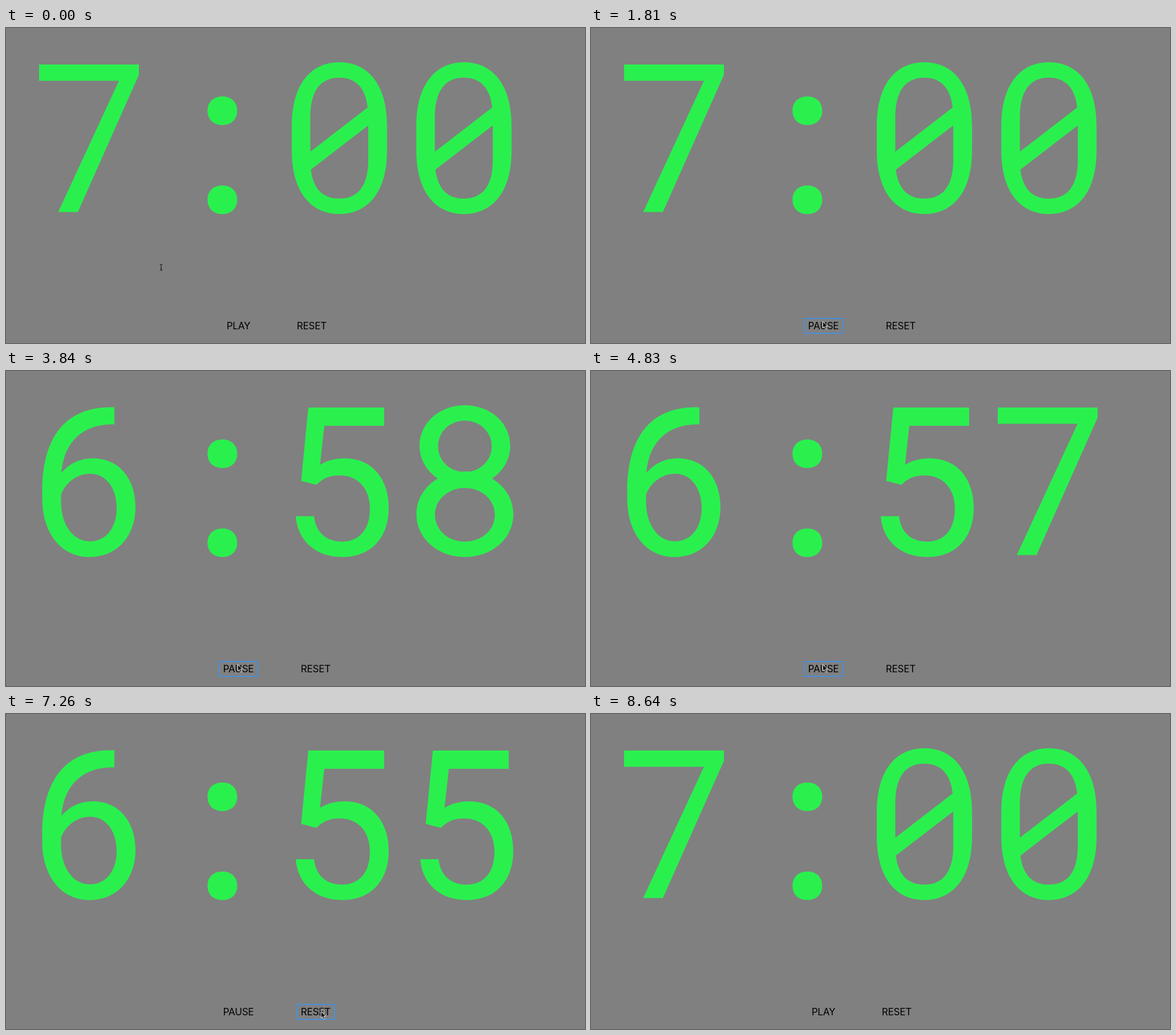
Write an HTML page that moves like this. It is 1015x552 px and loops after 8.74 s.

```html
<!DOCTYPE html>
<html lang="en">
<head>
<meta charset="utf-8">
<title>Countdown timer</title>
<style>
  html, body { margin: 0; width: 100%; height: 100%; overflow: hidden; background: #808080; }
  svg { display: block; width: 100%; height: 100%; }
  text { font: 17px Inter, Roboto, sans-serif; letter-spacing: -.2px; text-anchor: middle; fill: #000; }
</style>
</head>
<body>
<svg viewBox="0 0 1015 552">
  <rect width="1015" height="552" fill="#808080"/>
  <g fill="#2af04e">
    <path id="min"/>
    <path id="colon"/>
    <path id="tens"/>
    <path id="ones"/>
  </g>
  <text id="play" x="407.5" y="528"></text>
  <text id="reset" y="528">RESET</text>
  <rect id="ring" y="509" height="26" rx="1" fill="none" stroke="#4a8fdc" stroke-width="2"/>
  <circle id="click" r="7" fill="#fff" fill-opacity=".12" stroke="#222" stroke-width=".9"/>
  <path id="arrow" d="M.3 .3V11.8L2.9 9.3L4.9 13.8L7 12.9L5 8.6H8.7Z" fill="#111" stroke="#fff" stroke-width=".8" stroke-linejoin="round"/>
  <path id="beam" d="M-2.3 -5.5L0 -4.5L2.3 -5.5M0 -4.5V4.5M-2.3 5.5L0 4.5L2.3 5.5M-1.2 2H1.2" fill="none" stroke="#111"/>
</svg>
<script>
const LOOP = 8740, CELL = 218.33;
const PRESS_PLAY = 1690, RUN = 1810, PRESS_RESET = 7260, STOP = 7380, BLUR = 8640;
const $ = id => document.getElementById(id);

// Round-ended shape: curved from y0 to y1, straight to y2, curved to y3.
// A negative rx reverses the direction and so cuts a hole.
function capsule(cx, rx, y0, y1, y2, y3, kx = .56, ky = kx) {
  const l = cx - rx, r = cx + rx, a = cx - kx * rx, b = cx + kx * rx;
  const up = y1 - ky * (y1 - y0), down = y2 + ky * (y3 - y2);
  return `M${l} ${y1}C${l} ${up} ${a} ${y0} ${cx} ${y0}C${b} ${y0} ${r} ${up} ${r} ${y1}` +
         `V${y2}C${r} ${down} ${b} ${y3} ${cx} ${y3}C${a} ${y3} ${l} ${down} ${l} ${y2}Z`;
}
const oval = (cx, cy, rx, ry, k) => capsule(cx, rx, cy - ry, cy, cy, cy + ry, k);

const six = 'M190 63.5V93.5H187C135 93.5 102 123 97 178.5C112 161 131 153 152 153C200 153 227 191 227 238C227 288 196 326 146.5 326C95 326 63.5 282 63.5 224V211C63.5 138 88 63.5 184 63.5Z' +
  'M147 180C126 180 105 194 96.5 217V229C96.5 270 118 298.5 147 298.5C176 298.5 194 274 194 240C194 206 176 180 147 180Z';

const glyphs = {
  0: capsule(147.8, 83.5, 60, 171.5, 214.8, 326, .574, .674) +
     capsule(147.6, -50.8, 87, 157, 231, 299, .66) +
     'M83 227.4L211 128.7V161L83 259.5Z',
  5: 'M80.8 192.5L93.3 64H226.3V96H121.3L113.8 164.5C126.3 157 140.3 153 157.3 153C205.3 153 234.3 189 234.3 240C234.3 290 205.3 326 152.3 326C107.3 326 74.3 298 71.3 254.5H103.3C106.3 283 125.3 299 152.3 299C184.3 299 201.3 276 201.3 241C201.3 207 181.3 183 148.3 183C128.3 183 118.3 189 107.3 199.5Z',
  6: six,
  7: 'M58 64H233V82L126 322.5H91.5L198 92.5H58Z',
  8: oval(149.5, 131, 79.5, 71) + oval(149.5, 251, 85, 75) +
     oval(149.5, 132, -47, 45) + oval(149.5, 252, -52.5, 47),
  9: six
};

// Pointer moves, each from where the last one ended: start, steps, end, bend.
const STEP = 117;
const moves = [
  { start: 0, steps: 1, to: [272, 419.5] },
  { start: 270, steps: 1, to: [268, 340] },
  { start: 510, steps: 8, to: [404, 510], bend: [565, 390] },
  { start: 1450, steps: 1, to: [406, 514] },
  { start: 5790, steps: 2, to: [403.5, 517] },
  { start: 6110, steps: 6, to: [511, 522] },
  { start: 6850, steps: 2, to: [552, 521] },
  { start: 7790, steps: 4, to: [1016, 552] }
];

function pointerAt(t) {
  const i = moves.findLastIndex(m => m.start <= t);
  const { start, steps, to, bend } = moves[i];
  const from = i ? moves[i - 1].to : to;
  const p = Math.min(1, (Math.floor((t - start) / STEP) + 1) / steps);
  const u = 1 - (1 - p) ** 2;
  return to.map((end, k) => {
    const mid = bend ? bend[k] : (from[k] + end) / 2;
    return from[k] * (1 - u) ** 2 + 2 * mid * u * (1 - u) + end * u * u;
  });
}

const place = (el, x, y) => el.setAttribute('transform', `translate(${x} ${y})`);
const show = (el, on) => el.setAttribute('visibility', on ? 'visible' : 'hidden');

function setDigit(el, digit, cell) {
  const turn = digit === 9 ? 'rotate(180 145.5 193)' : '';
  el.setAttribute('d', glyphs[digit]);
  el.setAttribute('transform', `translate(${cell * CELL} 0) ${turn}`);
}

$('colon').setAttribute('d', oval(379.3, 145, 26, 25, .61) + oval(379.3, 301, 26, 25, .61));

function draw(t) {
  const running = t >= RUN && t < STOP;
  const left = 420 - (running ? Math.floor((t - 1750) / 1010) : 0);
  setDigit($('min'), Math.floor(left / 60), 0);
  setDigit($('tens'), Math.floor(left % 60 / 10), 2);
  setDigit($('ones'), left % 10, 3);

  const resetX = running ? 543 : 536;
  $('play').textContent = running ? 'PAUSE' : 'PLAY';
  $('reset').setAttribute('x', resetX);

  const onReset = t >= PRESS_RESET;
  const width = onReset ? 66 : running ? 67 : 54;
  show($('ring'), t >= PRESS_PLAY && t < BLUR);
  $('ring').setAttribute('x', (onReset ? resetX : 407.5) - width / 2);
  $('ring').setAttribute('width', width);

  const [x, y] = pointerAt(t);
  const overDigits = y < 421;
  show($('beam'), overDigits);
  show($('arrow'), !overDigits);
  place(overDigits ? $('beam') : $('arrow'), x, y);
  show($('click'), t >= PRESS_PLAY && t < RUN || t >= PRESS_RESET && t < STOP);
  place($('click'), x + 2, y + 1);
}

const start = performance.now();
function tick() {
  draw((performance.now() - start) % LOOP);
  requestAnimationFrame(tick);
}
tick();
</script>
</body>
</html>
```
